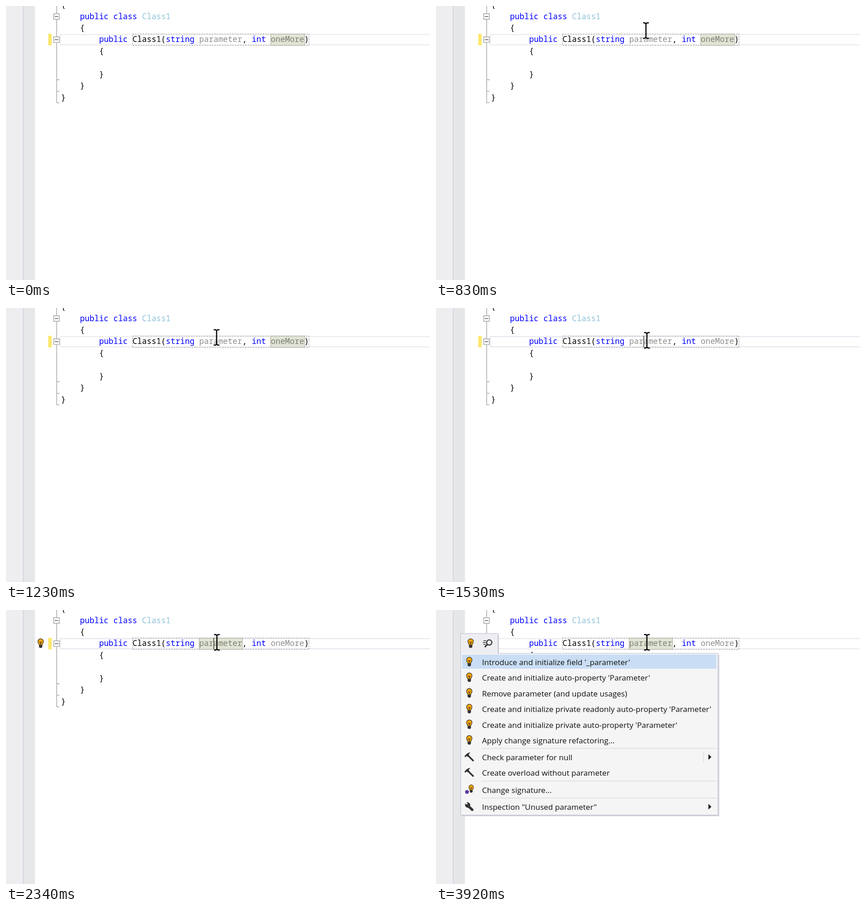
An HTML page that plays this animation: 930x602 px, repeating every 8000 ms.

```html
<!DOCTYPE html>
<html lang="en">
<head>
<meta charset="utf-8">
<title>Quick actions on an unused parameter</title>
<style>
  html, body { margin: 0; width: 100%; height: 100%; overflow: hidden; background: #fff; }
  svg { display: block; width: 930px; height: 602px; }
  text { white-space: pre; }
  .code { font: 17.43px "Noto Sans Mono", "DejaVu Sans Mono", monospace; }
  .menu { font: 17.09px "Open Sans", "Noto Sans", sans-serif; fill: #111; }
  .tip { font: 16.7px "Open Sans", "Noto Sans", sans-serif; fill: #111; }
  .panel { fill: #f5f5f6; stroke: #cccedb; stroke-width: 1.6; }
  .mark { fill: #e0e4d4; stroke: #a6aa98; }
</style>
</head>
<body>
<svg viewBox="0 0 930 602">
  <defs>
    <symbol id="bulb" viewBox="-10 -11 20 22" overflow="visible">
      <path d="M-3.6 3.4H3.6V8.2L1.8 10.2H-1.8L-3.6 8.2Z" fill="#333"/>
      <path d="M-2.9 4.2C-2.9 2 -6 .6 -6 -3.8A6 6 0 0 1 6 -3.8C6 .6 2.9 2 2.9 4.2Z" fill="#f8a60a" stroke="#383428" stroke-width="1.3"/>
      <path d="M-2.5 -3.2L0 -.8L2.5 -3.2M0 -.8V4.5" fill="none" stroke="#333" stroke-width="1.4"/>
    </symbol>
    <g id="hammer">
      <path d="M-3 -3.5L9.3 8.8" stroke="#333" stroke-width="3.7"/>
      <path d="M-10.8 -1.6L-7.6 -5.2C-4.5 -8.5 -2 -10 2.4 -9.8L-1 -6.4L-.4 -3.8L-3.8 -.5L-6 -2.2L-8.5 .6Z" fill="#333"/>
    </g>
    <path id="arrow" d="M-3 -6.3L3.6 0L-3 6.3Z" fill="#1e1e1e"/>
  </defs>

  <rect width="930" height="602" fill="#fff"/>
  <rect width="37" height="602" fill="#eeeef0"/>
  <rect x="37" width="26.5" height="602" fill="#e6e7e9"/>
  <rect x="37" width="1.4" height="602" fill="#cccedb"/>

  <rect id="line" x="119.2" y="62.8" width="830" height="22.4" fill="none" stroke-width="2.6"/>
  <rect x="92.6" y="61.2" width="7.6" height="25.2" fill="#fbe76c"/>
  <g fill="none" stroke="#a0a0a0" stroke-width="1.4">
    <path d="M111.2 0V16M111.2 30V67M111.2 81V212.6H117.5M111.2 162H117.5M111.2 187.4H117.5"/>
    <path d="M104.7 17H117V29.3H104.7ZM104.7 67.8H117V80.1H104.7Z"/>
    <path d="M107 23.2H114.7M107 74H114.7" stroke="#555"/>
  </g>
  <rect class="mark" id="markOld" x="580.5" y="61.5" width="74.5" height="25"/>
  <rect class="mark" id="markNew" x="423.5" y="61.5" width="95" height="25"/>
  <rect x="277.5" y="61.5" width="387" height="25" fill="none" stroke="#909090" stroke-width="1.1" stroke-dasharray="3.2 2.4"/>
  <g id="code" class="code"></g>
  <rect id="caret" x="455" y="61" width="1.4" height="25" fill="#333"/>
  <use id="gutterBulb" href="#bulb" x="66" y="62" width="20" height="22"/>

  <g id="tip" class="tip">
    <rect x="460.7" y="87.7" width="317.6" height="95.5" rx="1.5" fill="#f6f6f7" stroke="#c6c8d6" stroke-width="1.5"/>
    <path d="M479 111L488.5 106L494.5 109.3V114.5L485 119.8L479 116.5Z" fill="#0c4da2"/>
    <path d="M481.2 111.2L488.3 107.5L492.2 109.5L485 113.3Z" fill="#e8f0fa"/>
    <text x="507.5" y="121">(parameter)</text>
    <text x="604.5" y="121" fill="#0000ff">string</text>
    <text x="655" y="121">parameter</text>
    <text x="476.5" y="167">Parameter 'parameter' is never used</text>
  </g>

  <g id="menu" class="menu">
    <path d="M136.9 54V95M57 452H620.2V98" fill="none" stroke="#b9bac4" stroke-width="2" opacity=".75"/>
    <rect class="panel" x="53.8" y="51.8" width="82" height="45" style="fill:#eeeef2"/>
    <rect class="panel" x="54.3" y="95.3" width="564.2" height="355.2"/>
    <rect x="54.6" y="93" width="80.4" height="3" fill="#eeeef2"/>
    <rect x="57" y="98" width="558" height="31" fill="#c9def5"/>
    <path d="M100 304.2H618M100 375.8H618M100 413.2H618M587 311V335" stroke="#dcdde3" stroke-width="1.4"/>
    <use href="#bulb" x="66" y="62" width="20" height="22"/>
    <g fill="none" stroke="#333">
      <circle cx="116.8" cy="71.3" r="5.7" stroke-width="2.3"/>
      <path d="M112.8 75.3L107 81.5" stroke-width="3.2"/>
      <path d="M104 67.5H110M102.5 71.5H109.5M104 75.5H109" stroke-width="1.6"/>
    </g>
    <g id="rows"></g>
    <use href="#hammer" x="73" y="323"/>
    <use href="#hammer" x="73" y="357"/>
    <use href="#bulb" x="68.7" y="383" width="17" height="19"/>
    <circle cx="68" cy="399.8" r="4.2" fill="#5c3a9e"/>
    <path d="M69 429L79.5 439" stroke="#333" stroke-width="5.4" stroke-linecap="round"/>
    <path d="M64 425L68 429L70.5 426.5L66.8 423C71 421.5 76 424.5 75 430.5L70.5 434.5C65.5 434.5 62.5 430 64 425Z" fill="#333"/>
    <use href="#arrow" x="600.5" y="323"/>
    <use href="#arrow" x="600.5" y="432.3"/>
  </g>

  <path id="pointer" d="M-6.3 -16.9H-2.5L0 -15.2L2.5 -16.9H6.3M0 -15.2V15.2M-6.3 16.9H-2.5L0 15.2L2.5 16.9H6.3" fill="none" stroke="#000" stroke-width="2.5"/>
</svg>
<script>
const LOOP = 8000;
const BLUE = "#0000ff", BLACK = "#000", GRAY = "#8f8f8f", MARKED = "#7e8076", TYPE = "#8dc2d8";
const byId = id => document.getElementById(id);

function addText(parent, x, y, content, fill) {
  const node = document.createElementNS("http://www.w3.org/2000/svg", "text");
  node.setAttribute("x", x);
  node.setAttribute("y", y);
  if (fill) node.setAttribute("fill", fill);
  node.textContent = content;
  parent.append(node);
  return node;
}

// Each token: row, column, text, colour.
const tokens = [
  [-1, 0, "{", BLACK],
  [0, 4, "public", BLUE], [0, 11, "class", BLUE], [0, 17, "Class1", TYPE],
  [1, 4, "{", BLACK],
  [2, 8, "public", BLUE], [2, 15, "Class1(", BLACK], [2, 22, "string", BLUE],
  [2, 29, "parameter", GRAY], [2, 38, ",", BLACK], [2, 40, "int", BLUE],
  [2, 44, "oneMore", GRAY], [2, 51, ")", BLACK],
  [3, 8, "{", BLACK], [5, 8, "}", BLACK], [6, 4, "}", BLACK], [7, 0, "}", BLACK]
];
const words = {};
for (const [row, col, content, fill] of tokens)
  words[content] = addText(byId("code"), 120.5 + col * 10.46, 28.5 + row * 25.45, content, fill);

const fixes = [
  "Introduce and initialize field '_parameter'",
  "Create and initialize auto-property 'Parameter'",
  "Remove parameter (and update usages)",
  "Create and initialize private readonly auto-property 'Parameter'",
  "Create and initialize private auto-property 'Parameter'",
  "Apply change signature refactoring..."
];
fixes.forEach((label, i) => {
  const y = 115 + i * 34.4;
  addText(byId("rows"), 101, y + 6, label);
  const icon = byId("gutterBulb").cloneNode();
  icon.removeAttribute("id");
  icon.setAttribute("x", 63);
  icon.setAttribute("y", y - 12.5);
  byId("rows").append(icon);
});
[["Check parameter for null", 324], ["Create overload without parameter", 358.3],
 ["Change signature...", 396], ["Inspection \"Unused parameter\"", 433]]
  .forEach(([label, y]) => addText(byId("rows"), 101, y + 6, label));

const show = (id, on) => byId(id).setAttribute("visibility", on ? "visible" : "hidden");
const clamp = (v, max) => Math.max(0, Math.min(max, v));
const easeOut = p => 1 - (1 - p) ** 2;

function pointerAt(t) {
  if (t >= 1530) return [462.6, 71];
  if (t >= 1090) {
    const p = clamp(Math.floor((t - 1090) / 73.3) + 1, 3) / 3;
    return [460.5 + 2.1 * p, 54 + 16 * p];
  }
  const p = easeOut(clamp(Math.floor((t - 440) / 78), 5) / 5);
  return [744.4 - 283.9 * p, 562 - 508 * p];
}

function render(t) {
  const active = t >= 1530 && t < 3920;
  byId("pointer").setAttribute("transform", `translate(${pointerAt(t)})`);
  byId("line").setAttribute("stroke", active ? "#e9e9f1" : "#eeeeee");
  words.oneMore.setAttribute("fill", t < 1530 ? MARKED : GRAY);
  words.parameter.setAttribute("fill", t >= 2340 ? MARKED : GRAY);
  show("pointer", t >= 440);
  show("markOld", t < 1530);
  show("markNew", t >= 2340);
  show("tip", t >= 1310 && t < 1530);
  show("caret", t >= 1530 && t < 2770);
  show("gutterBulb", t >= 2340);
  show("menu", t >= 3920);
}

const start = performance.now();
function tick() {
  render((performance.now() - start) % LOOP);
  requestAnimationFrame(tick);
}
tick();
</script>
</body>
</html>
```
